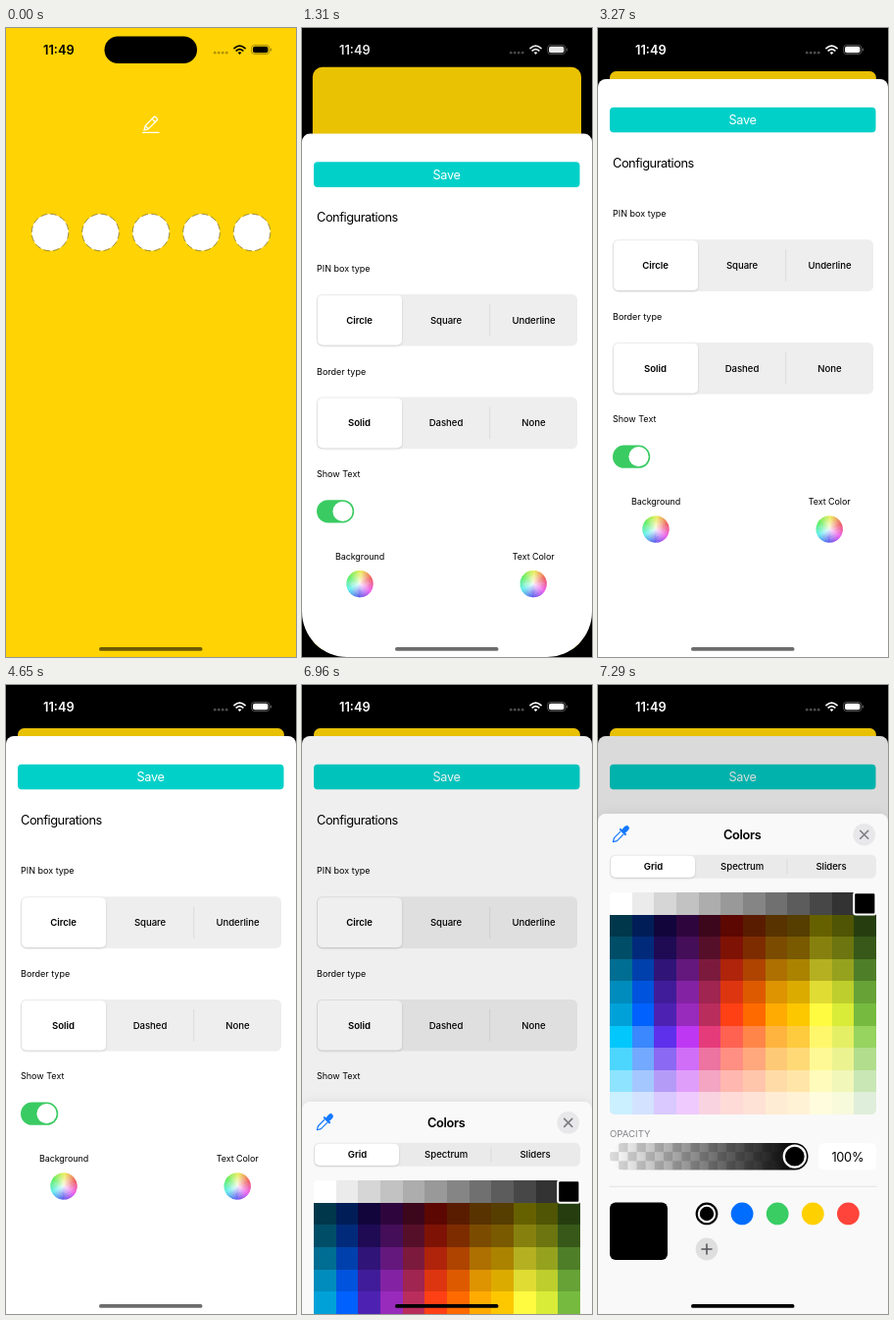
Recreate the animation shown at these times as an HTML page. Size 296x640 px, loop 8 s.

```html
<!DOCTYPE html>
<html lang="en">
<head>
<meta charset="utf-8">
<title>PIN settings</title>
<style>
html, body { margin: 0; width: 100%; height: 100%; overflow: hidden; background: #000; }
svg { display: block; width: 296px; height: 640px; }
text { font-family: Inter, Roboto, sans-serif; }
</style>
</head>
<body>
<svg id="stage" viewBox="0 0 296 640" xmlns="http://www.w3.org/2000/svg">
  <defs>
    <clipPath id="window"><rect id="windowShape" width="296" height="640"/></clipPath>
    <clipPath id="gridShape"><rect x="12" y="211" width="272" height="226" rx="5"/></clipPath>
    <clipPath id="sliderShape"><rect x="12" y="466" width="202.5" height="27.5" rx="13.75"/></clipPath>
    <radialGradient id="wheelGlow">
      <stop offset="0" stop-color="#fff" stop-opacity=".85"/>
      <stop offset="1" stop-color="#fff" stop-opacity=".08"/>
    </radialGradient>
    <linearGradient id="fade">
      <stop offset="0" stop-opacity="0"/>
      <stop offset=".95" stop-opacity="1"/>
    </linearGradient>
    <filter id="soft" x="-20%" y="-20%" width="140%" height="140%">
      <feDropShadow dx="0" dy="1" stdDeviation="1.3" flood-opacity=".16"/>
    </filter>
  </defs>
  <rect width="296" height="640"/>
  <g clip-path="url(#window)">
    <g id="home">
      <rect id="homeBack" width="296" height="640" fill="#ffd304"/>
      <rect id="press" x="123" y="80" width="50.5" height="38" rx="6" fill="#8a7a30" fill-opacity=".24"/>
      <g id="pencil" fill="none" stroke="#fff" stroke-width="1.3" stroke-linejoin="round" stroke-linecap="round">
        <path d="M141 104l1.2-4.6 8.6-8.7q1-.9 2 0l1.3 1.3q.9 1 0 2l-8.7 8.6zM149.2 92.6l3.2 3.2M142.2 99.5l3.2 3.1"/>
        <path d="M139.5 106.3h16.5"/>
      </g>
    </g>
    <g id="sheet"></g>
    <g id="picker"></g>
  </g>
  <g id="status">
    <rect x="100.5" y="8.5" width="94.5" height="27.5" rx="13.75" fill="#000"/>
    <g id="bar" fill="#000"></g>
  </g>
  <rect id="indicator" x="95" y="630" width="105.5" height="3.8" rx="1.9"/>
</svg>
<script>
const LOOP = 8000;
const NS = "http://www.w3.org/2000/svg";
const $ = id => document.getElementById(id);

function add(parent, tag, attrs) {
  const el = document.createElementNS(NS, tag);
  for (const key in attrs) el.setAttribute(key, attrs[key]);
  return parent.appendChild(el);
}
const box = (g, x, y, width, height, rx, fill, extra) =>
  add(g, "rect", { x, y, width, height, rx, fill, ...extra });
const disc = (g, cx, cy, r, fill, extra) => add(g, "circle", { cx, cy, r, fill, ...extra });
const line = (g, d, stroke, width) =>
  add(g, "path", { d, stroke, "stroke-width": width, fill: "none", "stroke-linecap": "round" });

// y is the middle of the capital letters
function label(g, str, x, y, size, { weight = 400, fill = "#000", anchor = "start", track = 0 } = {}) {
  add(g, "text", {
    x, y: y + size * 0.364, "font-size": size, "font-weight": weight,
    fill, "text-anchor": anchor, "letter-spacing": track
  }).textContent = str;
}

function segments(g, names, x, y, w, h, back, split, middles) {
  box(g, x, y, w, h, 5.5, back);
  box(g, x + 1, y + 1, 86, h - 2, 5, "#fff", { filter: "url(#soft)" });
  line(g, `M${split} ${y + h * 0.2}V${y + h * 0.8}`, "#d6d6d8", 0.8);
  names.forEach((name, i) => label(g, name, middles[i], y + h / 2, 9.6,
    { weight: i ? 500 : 600, anchor: "middle", track: -0.05 }));
}

function wheel(g, cx, cy, r) {
  const parts = 48;
  const at = a => `${cx + r * Math.sin(a)} ${cy - r * Math.cos(a)}`;
  for (let i = 0; i < parts; i++) {
    const a = i / parts * 2 * Math.PI, b = (i + 1.25) / parts * 2 * Math.PI;
    add(g, "path", {
      d: `M${cx} ${cy}L${at(a)}A${r} ${r} 0 0 1 ${at(b)}Z`,
      fill: `hsl(${(420 - i / parts * 360) % 360} 80% 60%)`
    });
  }
  disc(g, cx, cy, r, "url(#wheelGlow)");
}

function buildHome() {
  for (let i = 0; i < 5; i++) {
    disc($("home"), 45 + i * 51.5, 208, 18.8, "#fff",
      { stroke: "#5c5020", "stroke-width": 0.6, "stroke-dasharray": "6.5 3.3" });
  }
  add($("home"), "rect", { id: "homeDim", width: 296, height: 640, opacity: 0 });
}

function buildStatus() {
  const g = $("bar");
  label(g, "11:49", 38, 22, 12.8, { weight: 600, fill: "currentColor" });
  for (let i = 0; i < 4; i++) disc(g, 213.2 + i * 4, 25.2, 1.35, "currentColor", { opacity: 0.3 });
  line(g, "M233 20.6Q238.5 15.6 244 20.6", "currentColor", 1.7);
  line(g, "M235.2 23Q238.5 20.2 241.8 23", "currentColor", 1.7);
  add(g, "path", { d: "M236.6 24.9Q238.5 23.5 240.4 24.9L238.5 26.9Z", fill: "currentColor" });
  box(g, 250.6, 17.4, 18.2, 9.2, 3, "none", { stroke: "currentColor", "stroke-opacity": 0.4, "stroke-width": 0.8 });
  box(g, 252, 18.8, 15.4, 6.4, 1.9, "currentColor");
  box(g, 269.8, 20.6, 1, 2.8, 0.5, "currentColor", { opacity: 0.45 });
}

function buildSheet() {
  const g = $("sheet");
  const mids = [58.5, 147, 236.5];
  box(g, 0, 52, 296, 720, 8, "#fff");
  box(g, 12, 80.7, 271.5, 25.6, 4, "#00d0c8");
  label(g, "Save", 147.5, 93.7, 12.7, { fill: "#fff", anchor: "middle", track: -0.35 });
  label(g, "Configurations", 15, 137.2, 12.8, { track: -0.45 });
  label(g, "PIN box type", 15, 189, 9);
  segments(g, ["Circle", "Square", "Underline"], 15, 215.3, 266, 52.6, "#eeeeef", 191.7, mids);
  label(g, "Border type", 15, 293.7, 9);
  segments(g, ["Solid", "Dashed", "None"], 15, 320, 266, 52.6, "#eeeeef", 191.7, mids);
  label(g, "Show Text", 15, 398, 9);
  box(g, 15, 424.6, 38.2, 23.2, 11.6, "#3acb62");
  disc(g, 41.5, 436.2, 10.1, "#fff");
  [["Background", 59], ["Text Color", 236.2]].forEach(([name, x]) => {
    label(g, name, x, 482, 9, { anchor: "middle", track: -0.1 });
    wheel(g, x, 510, 13.6);
  });
  add(g, "rect", { id: "sheetDim", y: 52, width: 296, height: 720, rx: 8, opacity: 0 });
}

// Swatch rows are blended between four key rows
const keyRows = [
  "00374a 011d57 11053b 2e063d 3c071b 5c0701 5a1c00 583300 563d00 666100 4f5504 263e0f",
  "00a1d8 0061fe 4d22b2 982abc b92d5d ff4015 ff6a00 ffab01 fdc700 fefb41 d9ec37 76bb40",
  "01c7fc 3a87fe 5e30eb be38f3 e63b7a ff6250 ff8648 feb43f fecb3e fff76b e4ef65 96d35f",
  "cbf0ff d3e2ff d9c9fe efcaff f9d3e0 ffdbd8 ffe2d6 ffecd4 fff2d5 fefcdd f7fadb dfeeda"
].map(row => row.split(" ").map(hex => [0, 2, 4].map(i => parseInt(hex.slice(i, i + 2), 16))));
const rowMix = [0, 0.21, 0.51, 0.8, 1, 2, 2.37, 2.7, 3];

function swatch(row, col) {
  if (row === 0) {
    const v = col === 11 ? 0 : 255 - col * 20.4;
    return `rgb(${v},${v},${v})`;
  }
  const m = rowMix[row - 1], k = Math.min(2, Math.floor(m));
  return `rgb(${keyRows[k][col].map((c, i) => c + (keyRows[k + 1][col][i] - c) * (m - k))})`;
}

function buildPicker() {
  const g = $("picker");
  box(g, 0, 131, 296, 640, 8, "#f9f9f9", { style: "filter:drop-shadow(0 0 6px rgba(0,0,0,.08))" });

  const drop = add(g, "g", { transform: "translate(23 152) rotate(45)" });
  box(drop, -2.6, -11.5, 5.2, 8, 2.6, "#1479ff");
  box(drop, -4.6, -4.6, 9.2, 2.3, 1.1, "#1479ff");
  add(drop, "path", {
    d: "M-2.1-2V7.2L0 10.8 2.1 7.2V-2", fill: "none", stroke: "#1479ff",
    "stroke-width": 1.2, "stroke-linejoin": "round"
  });

  label(g, "Colors", 147.2, 152.3, 12.8, { weight: 600, anchor: "middle", track: -0.35 });
  disc(g, 271.7, 152.3, 11.3, "#e8e8ea");
  line(g, "M267.7 148.3l8 8m0-8l-8 8", "#7d7d82", 1.6);
  segments(g, ["Grid", "Spectrum", "Sliders"], 12, 172.7, 272, 24, "#eaeaeb", 193, [56.5, 147.2, 238]);

  const grid = add(g, "g", { "clip-path": "url(#gridShape)", "shape-rendering": "crispEdges" });
  const w = 272 / 12, h = 22.6;
  for (let row = 0; row < 10; row++)
    for (let col = 0; col < 12; col++)
      box(grid, 12 + col * w, 211 + row * h, w + 0.1, h + 0.1, 0, swatch(row, col));
  box(g, 261.2, 211.2, 22.2, 22.4, 2, "#000", { stroke: "#fff", "stroke-width": 2 });

  label(g, "OPACITY", 12, 456.3, 9.6, { fill: "#86868b" });
  const slider = add(g, "g", { "clip-path": "url(#sliderShape)" });
  box(slider, 12, 466, 203, 28, 0, "#fff");
  const s = 27.5 / 3;
  for (let row = 0; row < 3; row++)
    for (let col = 0; col < 23; col++)
      if ((row + col) % 2) box(slider, 12 + col * s, 466 + row * s, s, s, 0, "#dcdcdc");
  box(slider, 12, 466, 203, 28, 0, "url(#fade)");
  disc(g, 200.8, 479.7, 11, "#000", { stroke: "#fff", "stroke-width": 2.3 });
  box(g, 225, 466, 59, 27.5, 6, "#fff");
  label(g, "100%", 254.8, 480, 12.8, { anchor: "middle", track: -0.3 });
  line(g, "M12 510.3H284", "#dedee0", 0.8);

  box(g, 12, 526.6, 59, 58.4, 6, "#000");
  ["#000", "#006dff", "#39cd64", "#ffd000", "#ff443b"].forEach((fill, i) =>
    disc(g, 111 + i * 36.1, 538, 11.4, fill));
  disc(g, 111, 538, 8.2, "none", { stroke: "#fff", "stroke-width": 2 });
  disc(g, 111, 574, 11.4, "#dfdfe0");
  line(g, "M106 574h10m-5-5v10", "#58585c", 1.6);
}

const steps = [0, 980, 1090, 1200, 1310, 1410, 1520, 3270, 6730, 6840, 6960, 7070, 7180, 7290];
const spring = ms => {
  const k = Math.max(0, ms) * 0.018;
  return 1 - (1 + k) * Math.exp(-k);
};
const mix = (a, b, p) => a + (b - a) * p;
const set = (id, name, value) => $(id).setAttribute(name, value);

function draw(time) {
  const t = steps.filter(s => s <= time).pop();
  const open = spring(t - 1090), pick = spring(t - 6880);

  set("windowShape", "rx", t >= 1090 && t < 3270 ? 46 : 0);
  set("home", "transform", `translate(${12 * open} ${44 * open}) scale(${1 - 0.0815 * open})`);
  set("homeBack", "rx", t < 1090 ? 0 : mix(46, 7, open));
  set("homeDim", "rx", t < 1090 ? 0 : mix(46, 7, open));
  set("homeDim", "opacity", 0.09 * open);
  const pressed = t < 980 ? 0 : t < 1090 ? 0.6 : 1 - open;
  set("press", "opacity", pressed);
  $("pencil").style.stroke = `rgb(${mix(255, 184, pressed)},${mix(255, 154, pressed)},${mix(255, 22, pressed)})`;

  set("sheet", "transform", `translate(0 ${588 * (1 - open)})`);
  set("sheet", "visibility", open > 0 ? "visible" : "hidden");
  set("sheetDim", "opacity", 0.145 * pick);
  set("picker", "transform", `translate(0 ${mix(509, -2.7, pick)})`);
  set("picker", "visibility", pick > 0 ? "visible" : "hidden");

  const shade = Math.round(255 * open);
  $("bar").style.color = `rgb(${shade},${shade},${shade})`;
  set("indicator", "fill", pick > 0 ? "#000" : open > 0.1 ? "#6c6c6c" : "#6d5900");
}

buildHome();
buildStatus();
buildSheet();
buildPicker();

const start = performance.now();
function tick() {
  draw((performance.now() - start) % LOOP);
  requestAnimationFrame(tick);
}
tick();
</script>
</body>
</html>
```
